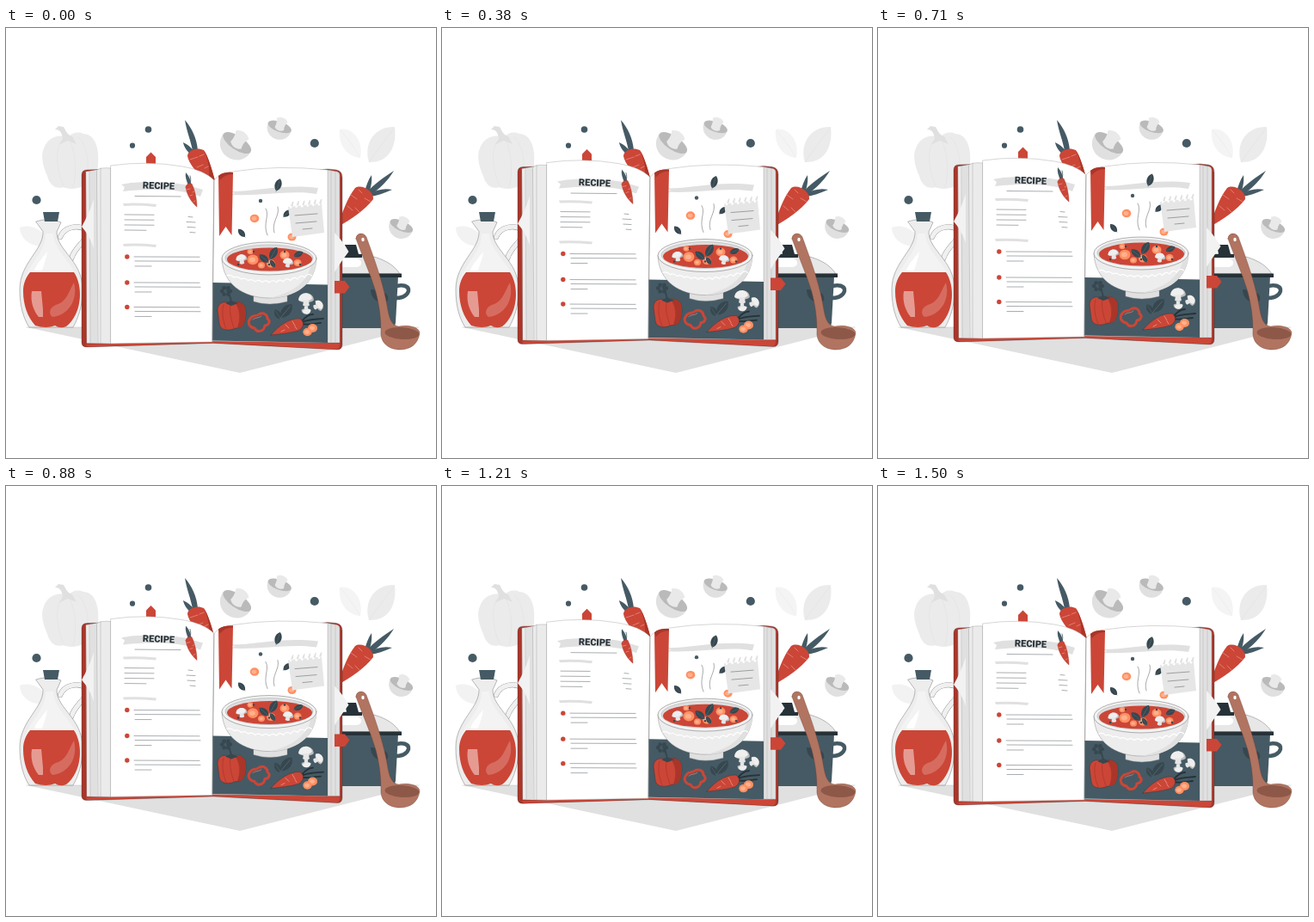
An HTML page with a canvas that plays this animation: 500x500 px, repeating every 1.54 s.

```html
<!DOCTYPE html>
<html lang="en">
<head>
<meta charset="utf-8">
<title>Recipe book</title>
<style>
html, body { margin: 0; width: 100%; height: 100%; overflow: hidden; background: #fff; }
canvas { display: block; width: 500px; height: 500px; }
</style>
</head>
<body>
<canvas id="stage"></canvas>
<script>
const LOOP = 1540, LIFT = 6, LEAD = 40;
const RED = '#cb4637', DEEP = '#a93629', SLATE = '#455a64', NIGHT = '#37474f', INK = '#263238';
const ORANGE = '#ff8f62', PALE = '#ebebeb', GREY = '#e0e0e0', SHADE = '#bdbdbd', FOG = '#f3f3f3';

const canvas = document.getElementById('stage');
const ratio = window.devicePixelRatio || 1;
canvas.width = canvas.height = 500 * ratio;
const ctx = canvas.getContext('2d');

function paint(path, fill, stroke, width = 0.6) {
  if (fill) { ctx.fillStyle = fill; ctx.fill(path); }
  if (stroke) { ctx.strokeStyle = stroke; ctx.lineWidth = width; ctx.stroke(path); }
}

const cache = new Map();
function shape(d, fill, stroke, width) {
  if (!cache.has(d)) cache.set(d, new Path2D(d));
  paint(cache.get(d), fill, stroke, width);
}

function oval(x, y, rx, ry, fill, stroke, width, turn = 0) {
  const path = new Path2D();
  path.ellipse(x, y, rx, ry, turn, 0, Math.PI * 2);
  paint(path, fill, stroke, width);
}

const dot = (x, y, r, fill) => oval(x, y, r, r, fill);
const line = (d, color = INK, width = 0.4) => shape(d, null, color, width);

function placed(x, y, angle, scale, draw) {
  ctx.save();
  ctx.translate(x, y);
  ctx.rotate(angle * Math.PI / 180);
  ctx.scale(scale, scale);
  draw();
  ctx.restore();
}

function leaf(x, y, angle, length, fill = NIGHT, vein = '#60737c') {
  placed(x, y, angle, length / 20, () => {
    shape('M0-10C7-5 7 5 0 10C-7 5-7-5 0-10Z', fill);
    line('M0-7V11', vein, 0.6);
  });
}

function mushroom(x, y, angle, scale) {
  placed(x, y, angle, scale, () => {
    shape('M-18 1C-18-21 18-21 18 1C12 8-12 8-18 1Z', SHADE);
    shape('M-18 1C-17-20 12-21 14-3C8 4-9 6-18 1Z', '#efefef');
    shape('M-7 1C-6 6-7 9-8 13C-4 17 5 17 8 13C7 9 6 5 7 1Z', '#e6e6e6');
  });
}

// mushroom seen from below: dome, gills, stem pointing up
function upturned(x, y, angle, scale) {
  placed(x, y, angle, scale, () => {
    shape('M-19-3C-20 9-10 17 0 17C10 17 20 9 19-3Z', GREY);
    oval(0, -3, 19, 8, '#bababa');
    shape('M-7 0C-6-6-7-10-9-14C-5-19 5-19 9-14C7-10 6-5 8 0C4 4-3 4-7 0Z', '#e9e9e9');
  });
}

function slice(x, y, r) {
  oval(x, y, r, r * 0.9, ORANGE);
  oval(x - r * 0.1, y, r * 0.55, r * 0.45, '#ffb08c');
}

function backdrop() {
  // faint bell pepper
  shape('M44 140C40 148 43 161 48 172C51 183 58 188 67 185C75 189 84 186 90 184C101 184 106 173 107 158C109 138 102 123 90 123C84 120 76 122 72 127C58 122 47 130 44 140Z', PALE);
  shape('M66 129C65 121 62 118 57 118L61 114L67 115C70 120 71 124 77 126L82 135L72 131L61 136Z', GREY);
  line('M62 136C56 150 62 175 68 185M75 133C82 148 82 172 78 185M84 127C97 138 98 169 91 183', '#e2e2e2', 0.7);
  shape('M388 118C402 115 416 130 412 151C396 150 386 135 388 118Z', '#f4f4f4');
  line('M390 120C398 130 406 140 411 150', PALE, 0.7);
  shape('M452 115C430 114 415 133 422 156C444 157 455 139 452 115Z', PALE);
  line('M451 117C441 130 430 144 422 156', '#e2e2e2', 0.7);
  shape('M16 232C30 227 47 236 49 253C32 256 17 248 16 232Z', '#f2f2f2');

  upturned(267, 136, 34, 1);
  upturned(317.5, 117, 20, 0.75);
  upturned(459, 232, 24, 0.75);

  dot(165.5, 118, 3.8, SLATE);
  dot(147, 136.7, 3.1, SLATE);
  dot(35.5, 200, 5.1, SLATE);
  dot(358.8, 134, 5.1, SLATE);
  shape('M24 348H480L272 401Z', GREY);
  line('M24 348H480', SHADE, 0.5);
}

function bottle() {
  const handle = 'M63 243C68 231 84 228 93 235C96 248 81 252 76 268';
  line(handle, '#8b8b8b', 6);
  line(handle, '#f0f0f0', 5.2);
  shape('M35 225C44 222 55 222 64 226L59 237C59 259 89 270 89 304C89 324 84 337 78 348H27C20 337 16 323 16 304C16 273 44 258 43 237Z', '#ededed', '#777', 0.5);
  shape('M46 239C47 263 21 276 20 303C20 323 26 337 33 346H72C81 335 86 322 86 304C85 276 56 263 55 239Z', '#f3f3f3');
  shape('M28 284H79C88 297 88 319 81 333C78 339 74 344 70 347Q63 350 57 346Q47 350 34 346C25 336 20 322 20 306C20 297 23 290 28 284Z', RED);
  shape('M30 306H41L43 327V336H38C32 329 28 318 30 306Z', '#e59b92');
  shape('M33 282C35 275 42 268 48 260C46 273 43 277 42 282Z', '#fff');
  shape('M79 296C84 316 73 334 54 336C48 331 52 323 61 321C71 317 74 304 79 296Z', '#d66c60');
  shape('M43 214H62L60 225H45Z', SLATE);
}

function carrots() {
  shape('M208 107C216 116 222 129 223 142L217 143C215 131 210 120 208 107Z', SLATE);
  shape('M206 133C212 136 218 141 220 146L216 148C211 144 207 139 206 133Z', SLATE);
  shape('M211 149C211 142 222 138 230 142C235 149 239 163 244 181L231 175C221 168 213 158 211 149Z', RED);
  line('M214 153L223 150M222 162L229 159M230 147L225 149M237 160L231 163', '#e58478', 0.9);
  shape('M230 142C235 149 239 163 244 181L236 177C237 163 235 152 230 142Z', DEEP);

  shape('M417 190C419 183 421 177 425 171C426 179 424 187 421 194Z', SLATE);
  shape('M419 192C427 182 439 174 451 166C444 178 434 187 423 195Z', SLATE);
  shape('M422 193C431 188 440 186 449 188C440 192 431 195 423 196Z', SLATE);
  shape('M406 186C414 181 428 190 427 199C418 211 401 223 386 231C390 217 396 199 406 186Z', RED);
  line('M401 194L408 199M397 207L403 212M424 202L417 198M411 214L406 209M410 188L414 192', '#e58478', 0.9);
}

function pot() {
  line('M451 301C461 297 469 300 468 306C466 313 459 314 451 314', SLATE, 4.5);
  shape('M382 289H456L453 343Q452 349 446 349H382Z', SLATE);
  shape('M382 264C417 259 447 268 458 286H382Z', '#e7e7e7', '#777', 0.5);
  shape('M383 268H407C415 269 415 277 408 278H383Z', '#fff');
  shape('M382 285.500H460V290H382Z', INK);
  shape('M394 252H407L410 263H414V267H391V263H396Z', INK);
  shape('M424 304C434 304 440 310 439 320C430 319 424 313 424 304ZM441 308C446 313 445 317 440 321C437 316 437 312 441 308Z', NIGHT);
}

function ladle() {
  shape('M407 245C407 238 416 237 419 243C428 268 437 292 442 317C445 333 446 346 457 347C466 345 481 347 481 355C479 368 470 374 458 374C444 374 435 365 436 353C436 336 434 322 430 307C424 286 414 265 407 245Z', '#b17460', '#70463b', 0.4);
  oval(460.5, 355, 20, 7, '#8d5848', null, 0, 0.06);
  oval(415, 246, 1.7, 2.2, '#fff');
}

function cover() {
  shape('M163 164V150L168.5 144.5L174 150V164Z', RED);
  shape('M88 171Q88 165 94 165L125 164L242 178L374 164L384 165Q391 166 391 174V368Q391 374 385 374L241 366.500L95 371Q88 371.500 88 366Z', DEEP, INK, 0.3);
  shape('M92 368L240 363L388 367V368Q388 373.500 384 373.500L241 366L95 370.500Z', RED);
  // page blocks
  shape('M93 167L106 165Q110 162 122 163V367L94 366.500Z', PALE, '#999', 0.4);
  shape('M98 167L106 165V366H98Z', GREY);
  line('M97 167L98 366M105.500 166L107 366M110 163V367', '#999');
  shape('M374 165L385 167Q388 168 388 171V366H374Z', GREY, '#999', 0.4);
  line('M378 166V366M383 167V366', '#aaa');
  shape('M382 294H394L399.500 301L394 308.500H382Z', RED);
  shape('M102 199Q97 215 88 231Q97 241 102 256Z', '#f2f2f2');
  shape('M382 238Q391 247 398.500 260Q390 271 382 284Z', '#f2f2f2');
}

function leftPage() {
  shape('M122 160Q164 154 205 161Q230 165 242 177L240 365L122 367Z', '#fff', '#999', 0.4);
  shape('M134 182C154 177 187 179 208 182L229 188L226 196C206 188 174 186 136 190L138 185Z', GREY);
  placed(177.4, 187.2, 2, 1, () => {
    ctx.fillStyle = INK;
    ctx.font = '900 11px Roboto, sans-serif';
    ctx.textAlign = 'center';
    ctx.fillText('RECIPE', 0, 0);
  });
  line('M150 195.500L203 196');
  for (const y of [204, 251]) shape(`M136 ${y}Q153 ${y - 1} 175 ${y + 1}L174 ${y + 4}Q154 ${y + 2} 137 ${y + 3}Z`, GREY);
  [217, 223, 229, 235].forEach((y, i) => {
    line(`M138 ${y}L${i == 3 ? 163 : 172} ${y + 0.3}`);
    line(`M${[212, 210, 211, 214][i]} ${y + 2.500}L${i ? 220 : 217} ${y + 3}`);
  });
  for (const y of [266, 296, 324.5]) {
    dot(140.8, y, 2.7, RED);
    line(`M149 ${y}L225 ${y + 0.3}M150 ${y + 5}L226 ${y + 5.3}M150 ${y + 11}H169`);
  }
  shape('M209 168C213 172 215 177 215 182L212 183C210 178 208 173 209 168Z', SLATE);
  line('M214 182C215 177 215 175 214 172', SLATE, 0.8);
  shape('M209 185Q210 180 216 181C219 187 222 198 222 208C216 203 210 194 209 185Z', RED, DEEP, 0.4);
  line('M210 188L214 187M214 195L217 194M219 190L217 191M218 202L220 201', '#f0a59b', 0.6);
}

function bowl() {
  shape('M288 309H327V318Q306 324 288 318Z', GREY, '#999', 0.4);
  shape('M251 268C252 298 276 314 306 314C336 314 360 298 361 268Z', '#ededed', '#777', 0.4);
  shape('M361 268C360 298 336 314 306 314C335 308 350 294 354 278Z', GREY);
  let wave = 'M257 288';
  for (let i = 0; i < 12; i++) {
    const x = 257 + i * 8.2, bend = 8 * Math.sin((i + 1) / 12 * Math.PI);
    wave += `Q${x + 4} ${284 + bend} ${x + 8.2} ${288 + bend}`;
  }
  line(wave, '#fff', 1.2);
  oval(306, 268, 55, 19, FOG, '#666', 0.5);
  oval(306, 267.5, 51, 15.5, '#dcdcdc', '#999', 0.4);
  oval(306.5, 269, 49.5, 13.500, RED);
  slice(287, 269.500, 6.500);
  slice(324, 264, 5.500);
  slice(308, 274, 5);
  slice(339, 273, 4.500);
  slice(297, 276, 4);
  slice(284, 260, 3.5);
  mushroom(274, 269, -5, 0.36);
  mushroom(328, 273, 10, 0.34);
  leaf(300, 268, -50, 14);
  leaf(311, 262, 30, 16);
  leaf(310, 274, -30, 10);
  leaf(340, 263, 65, 12);
  for (let i = 0; i < 5; i++) dot(270 + i * 18, 275 - i % 2 * 15, 1.2, NIGHT);
}

function vegetables() {
  line('M262 319C261 314 260 309 257 305', NIGHT, 2);
  for (let i = 0; i < 6; i++) {
    const a = i * Math.PI / 3;
    dot(256 + 4.8 * Math.cos(a), 306 + 4.2 * Math.sin(a), 2.3, NIGHT);
  }
  shape('M246 328C246 319 254 317 261 320C269 316 279 319 279 330C279 342 275 350 267 349C261 352 249 353 248 344Z', RED, INK, 0.4);
  shape('M266 319C276 317 280 325 279 333C278 346 274 350 269 348C274 337 272 326 266 319Z', DEEP);
  line('M253 322C250 331 253 343 256 350M261 321C259 332 263 342 265 349M268 321C273 331 272 341 270 348', DEEP, 0.7);
  shape('M255 320L262 317L270 320L262 323Z', NIGHT);
  shape('M284 338C287 333 291 336 294 333C299 330 304 333 304 338C309 342 304 346 301 346C300 353 292 355 289 349C283 348 280 343 284 338Z', null, RED, 3);
  line('M287 339C290 336 294 338 297 335', '#e58478', 0.7);

  leaf(316, 333, -32, 13);
  leaf(326, 329, 40, 20);
  line('M345 342C353 338 361 339 369 338M343 344C353 346 361 343 366 343M344 341C349 335 354 333 357 333', INK, 1.8);
  shape('M308 357C318 345 331 337 342 338C348 342 346 349 340 352C329 355 318 356 308 357Z', RED, INK, 0.4);
  line('M325 345L329 349M333 341L336 346M320 353L324 351M338 350L336 347', '#e99b91', 0.8);
  slice(356.500, 349, 5.5);
  slice(350.500, 353.500, 5.2);
  mushroom(349, 316, 0, 0.49);
  mushroom(363, 323, 65, 0.36);
  mushroom(349, 328, 180, 0.3);
}

function notePaper() {
  shape('M328 208L367 204L370 238L333 243Z', '#e6e6e6');
  for (let i = 0; i < 6; i++) {
    const x = 331 + i * 6.6;
    shape(`M${x} ${207 - i * 0.6}l2-5l1.500 0l-1 5Z`, GREY);
    dot(x, 208.500 - i * 0.65, 1.3, '#fff');
  }
  line('M336 218L362 216M337 227L361 225M345 234L356 233');
}

function rightPage() {
  shape('M242 177Q246 170 264 167Q315 159 374 165V366L240 364Z', '#fff', '#999', 0.4);
  shape('M240 296L374 298.500V366L240 363.500Z', SLATE);
  line('M242 177L240 365', '#999', 0.6);
  shape('M262 190C291 190 322 181 363 186L361 193C330 188 296 196 262 194L266 192Z', GREY);
  shape('M247 172Q253 167 264 168L262.500 241L255.500 231L248 242Z', RED);
  shape('M247 172Q253 167 264 168V170Q254 170 249 177Z', DEEP);
  leaf(316.500, 182.500, 18, 15);
  leaf(327, 215.500, 48, 12);
  leaf(274, 238.500, -40, 12);
  dot(296, 201, 2.2, SLATE);
  slice(289, 221.500, 5.3);
  slice(332.500, 243, 5);
  line('M302 210C307 218 298 228 304 241M316 208C319 218 308 226 312 238', '#555', 0.5);
  notePaper();
  bowl();
  vegetables();
}

function draw(now) {
  const phase = (now % LOOP + LEAD) / LOOP * Math.PI * 2;
  ctx.setTransform(ratio, 0, 0, ratio, 0, 0);
  ctx.fillStyle = '#fff';
  ctx.fillRect(0, 0, 500, 500);
  ctx.lineCap = ctx.lineJoin = 'round';
  backdrop();
  bottle();
  carrots();
  pot();
  ctx.translate(0, -LIFT * (1 - Math.cos(phase)) / 2);
  cover();
  leftPage();
  rightPage();
  ctx.setTransform(ratio, 0, 0, ratio, 0, 0);
  ladle();
}

const start = performance.now();
function tick() {
  draw(performance.now() - start);
  requestAnimationFrame(tick);
}
tick();
</script>
</body>
</html>
```
